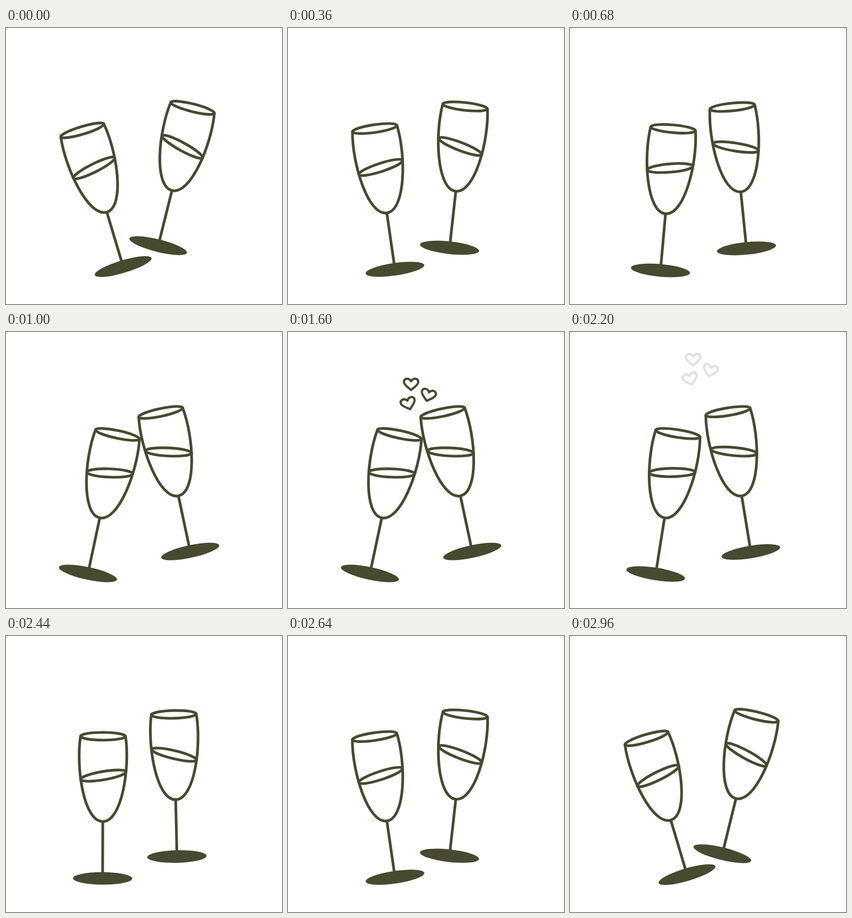
An HTML page for the animation above (3000 ms loop, 500x500 px).

```html
<!DOCTYPE html>
<html lang="en">
<head>
<meta charset="utf-8">
<title>Cheers</title>
<style>
  html, body { margin: 0; height: 100%; overflow: hidden; background: #fff; }
  svg { display: block; width: 100%; height: 100%; }
  .ink { fill: none; stroke: #474930; stroke-width: 4.9; stroke-linecap: round; stroke-linejoin: round; }
  .base { fill: #474930; stroke: none; }
  #hearts { stroke-width: 4; }
</style>
</head>
<body>
<svg viewBox="0 0 500 500" class="ink">
  <defs>
    <g id="glass">
      <ellipse cy="-128.5" rx="40.7" ry="7"/>
      <path d="M-40.7-128.5C-49.5-72-34.5 26 0 26S49.5-72 40.7-128.5M0 26V122"/>
      <ellipse class="base" cy="129" rx="53.7" ry="11.4"/>
    </g>
    <path id="heart" d="M0-5C-4-12-13-10.5-13-3.5C-13 1.5-5 6.5 0 11C5 6.5 13 1.5 13-3.5C13-10.5 4-12 0-5Z"/>
  </defs>
  <g id="left">
    <use href="#glass"/>
    <ellipse rx="41.8" ry="7.5" transform="translate(.8 -57.2) rotate(-9.8)"/>
  </g>
  <g id="right">
    <use href="#glass"/>
    <ellipse rx="41.8" ry="7.3" transform="translate(-.8 -55.5) rotate(14.7)"/>
  </g>
  <g id="hearts">
    <use href="#heart" transform="translate(223 94.3)"/>
    <use href="#heart" transform="translate(254.2 114.2) rotate(15)"/>
    <use href="#heart" transform="translate(217.9 129.4) rotate(-17)"/>
  </g>
</svg>
<script>
const LOOP = 3000;
const [left, right, hearts] = ['left', 'right', 'hearts'].map(id => document.getElementById(id));
const clamp = x => Math.min(1, Math.max(0, x));
const ramp = (t, from, to) => clamp((t - from) / (to - from));
const smooth = p => p * p * (3 - 2 * p);

// Swing a glass about a pivot slightly beside its axis
function swing(el, x, y, offset, angle) {
  el.setAttribute('transform', `translate(${x} ${y}) rotate(${angle}) translate(${offset} 0)`);
}

function draw(t) {
  const lean = smooth(ramp(t, 0, 1000)) - smooth(ramp(t, 2000, 3000));
  swing(left, 170.1, 310.1, 5.3, -16.7 + 28.7 * lean);
  swing(right, 311.8, 270.4, -5, 14 - 26 * lean);

  hearts.setAttribute('transform', `translate(0 ${(1600 - t) * 0.0745})`);
  hearts.setAttribute('opacity', ramp(t, 1000, 1250) * (1 - ramp(t, 2000, 2240)));
}

const start = performance.now();
function tick() {
  draw((performance.now() - start) % LOOP);
  requestAnimationFrame(tick);
}
tick();
</script>
</body>
</html>
```
